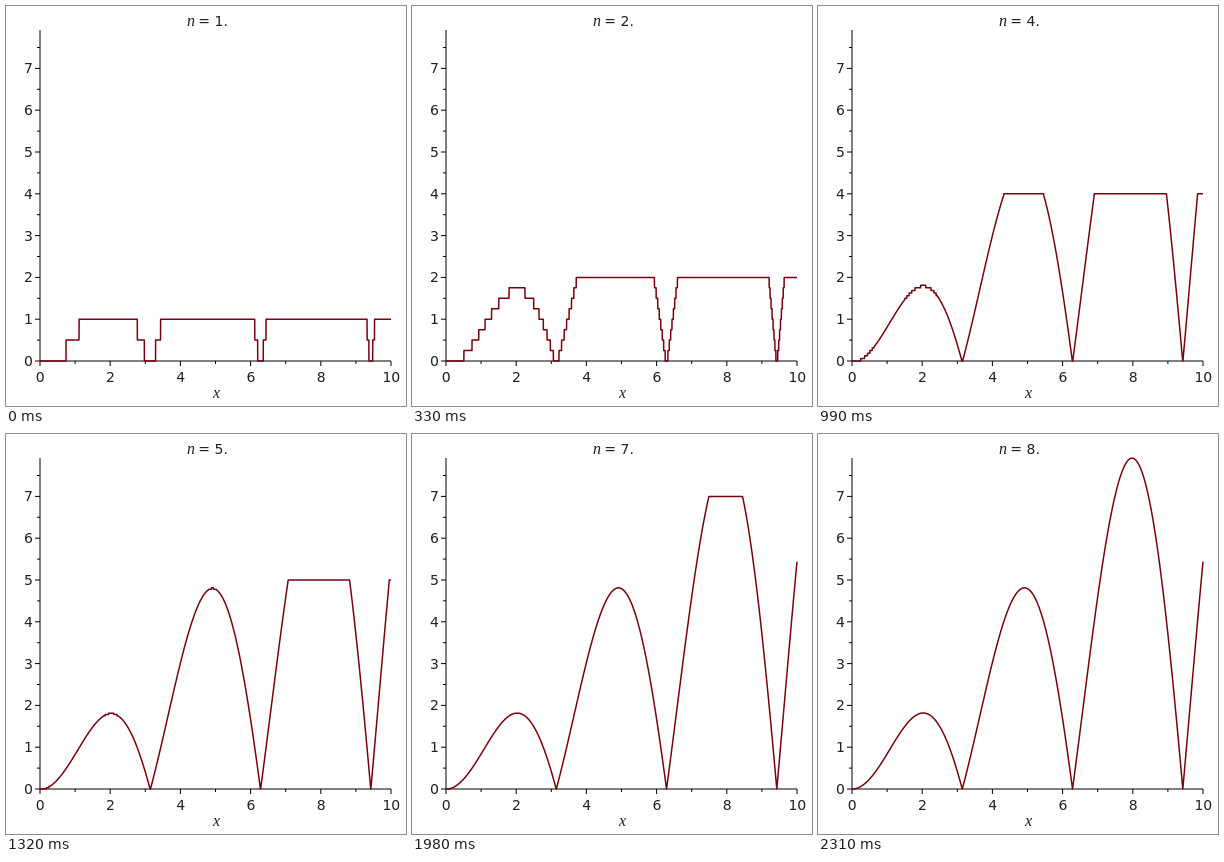
An HTML page with a canvas for the animation above (2.64 s loop, 400 by 400 pixels).

```html
<!DOCTYPE html>
<html>
<head>
<meta charset="utf-8">
<style>
html, body { margin: 0; width: 100%; height: 100%; overflow: hidden; background: #fff; }
canvas { display: block; }
</style>
</head>
<body>
<canvas id="stage" width="400" height="400"></canvas>
<script>
const ctx = document.getElementById("stage").getContext("2d");
const STEP_MS = 330, COUNT = 8;
const SANS = '14px "DejaVu Sans", sans-serif';
const ITALIC = 'italic 16px "Liberation Serif", serif';
const px = x => 34 + 35.1 * x;
const py = y => 355 - 41.8 * y;

function text(str, x, y, font, align = "left") {
  ctx.font = font;
  ctx.textAlign = align;
  ctx.fillText(str, x, y);
}

function line(x1, y1, x2, y2) {
  ctx.beginPath();
  ctx.moveTo(x1, y1);
  ctx.lineTo(x2, y2);
  ctx.stroke();
}

function drawAxes() {
  ctx.strokeStyle = "#000";
  ctx.lineWidth = 1;
  line(34, 24, 34, 355);
  line(34, 355, 385, 355);
  for (let x = 0; x <= 10; x++) {
    const major = x % 2 === 0;
    line(px(x), 355, px(x), major ? 360 : 358);
    if (major) text(x, px(x) + 0.3, 375.5, SANS, "center");
  }
  for (let y = 0; y <= 7.5; y += 0.5) {
    const major = y % 1 === 0;
    line(34, py(y), major ? 29 : 31, py(y));
    if (major) text(y, 27, py(y) + 5, SANS, "right");
  }
  text("x", 210.5, 392, ITALIC, "center");
}

// Simple-function approximation of |x sin x|: dyadic steps, capped at n.
function approx(x, n) {
  const h = 2 ** -n;
  const f = Math.abs(x * Math.sin(x));
  if (f >= n) return n;
  if (f < h) return 0;
  const slope = Math.abs(Math.sin(x) + x * Math.cos(x));
  // Steps narrower than two pixels blend into a line.
  const stepped = n < 3 || 35 * h > 2 * slope;
  return stepped ? Math.floor(f / h) * h : f - h / 2;
}

function drawCurve(n) {
  ctx.beginPath();
  for (let i = 0; i <= 3500; i++) {
    const x = i / 350;
    ctx.lineTo(px(x), py(approx(x, n)));
  }
  ctx.strokeStyle = "#78000e";
  ctx.lineWidth = 1.5;
  ctx.lineJoin = "round";
  ctx.stroke();
}

function draw(n) {
  ctx.fillStyle = "#fff";
  ctx.fillRect(0, 0, 400, 400);
  ctx.fillStyle = "#222";
  drawAxes();
  text("n", 181, 20, ITALIC);
  text(`= ${n}.`, 192.3, 20, SANS);
  drawCurve(n);
}

const start = performance.now();
let shown = 0;
function tick() {
  const n = 1 + Math.floor((performance.now() - start) / STEP_MS) % COUNT;
  if (n !== shown) draw(shown = n);
  requestAnimationFrame(tick);
}
tick();
</script>
</body>
</html>
```
